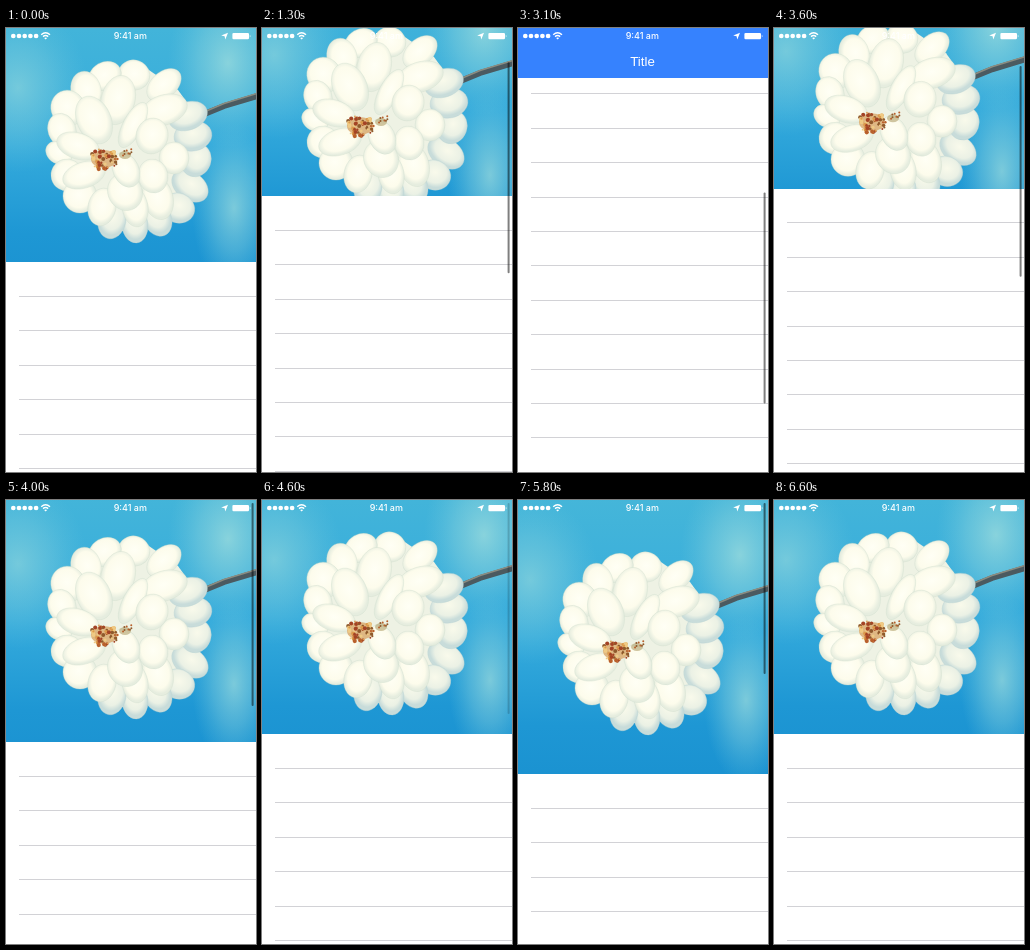
These frames come from a looping animation (250x444 px, 6.7 s). An HTML page:

```html
<!DOCTYPE html>
<html lang="en">
<head>
<meta charset="utf-8">
<title>Collapsing header</title>
<style>
  html, body { margin: 0; width: 100%; height: 100%; overflow: hidden; background: #fff; }
  svg { display: block; width: 100%; height: 100%; }
  text { fill: #fff; text-anchor: middle; }
</style>
</head>
<body>
<svg viewBox="0 0 250 444" xmlns="http://www.w3.org/2000/svg">
  <defs>
    <linearGradient id="sky" x1="0" y1="0" x2="0" y2="1">
      <stop offset=".1" stop-color="#45b6d9"/>
      <stop offset=".5" stop-color="#35abdc"/>
      <stop offset=".75" stop-color="#1e97d4"/>
      <stop offset="1" stop-color="#188fcf"/>
    </linearGradient>
    <radialGradient id="glow">
      <stop offset="0" stop-color="#a5e0dd" stop-opacity=".9"/>
      <stop offset=".5" stop-color="#90d6dd" stop-opacity=".5"/>
      <stop offset="1" stop-color="#70c8dc" stop-opacity="0"/>
    </radialGradient>
    <radialGradient id="lit" cy=".45">
      <stop offset="0" stop-color="#fffff5"/>
      <stop offset=".75" stop-color="#fdfcec"/>
      <stop offset="1" stop-color="#e6eddf"/>
    </radialGradient>
    <radialGradient id="dim" cy=".4">
      <stop offset="0" stop-color="#f9faeb"/>
      <stop offset=".7" stop-color="#ebf1e5"/>
      <stop offset="1" stop-color="#c8dcda"/>
    </radialGradient>
    <clipPath id="crop"><rect id="cropBox" width="250" height="234"/></clipPath>
  </defs>

  <rect width="250" height="444" fill="#fff"/>
  <g id="rows" fill="#d2d2d6"></g>

  <g clip-path="url(#crop)">
    <g id="photo">
      <rect y="-60" width="250" height="354" fill="url(#sky)"/>
      <ellipse cx="12" cy="60" rx="70" ry="85" fill="url(#glow)" opacity=".6"/>
      <ellipse cx="222" cy="35" rx="60" ry="85" fill="url(#glow)" opacity=".8"/>
      <ellipse cx="228" cy="180" rx="42" ry="85" fill="url(#glow)" opacity=".75"/>
      <path d="M196 87 L218 78 L251 68" fill="none" stroke="#4b5a60" stroke-width="6"/>
      <path d="M198 84 L218 75.5 L251 65.5" fill="none" stroke="#8b8c80" stroke-width="1.5"/>
      <path d="M86 46 L140 40 L172 62 L196 95 L192 160 L168 188 L128 206 L98 198 L70 172 L50 130 L55 85Z" fill="#eef2e4"/>
      <g id="petals"></g>
      <g id="heart"></g>
    </g>
    <rect id="tint" width="250" height="340" fill="#3682fe"/>
    <text id="title" x="124.5" y="38" font-family="'Liberation Sans', Arial, sans-serif" font-size="13.3">Title</text>
  </g>

  <rect id="thumb" x="245.6" width="2" rx="1" fill="#000"/>

  <g id="status" fill="#fff">
    <g id="signal"></g>
    <g fill="none" stroke="#fff" stroke-width="1.4">
      <path d="M35.2 6.7 Q39.6 2.9 44 6.7"/>
      <path d="M37 8.6 Q39.6 6.5 42.2 8.6"/>
    </g>
    <path d="M38.1 10 Q39.6 8.9 41.1 10 L39.6 11.6Z"/>
    <text x="124.3" y="11.3" font-family="Inter, 'Liberation Sans', sans-serif" font-size="9" font-weight="500">9:41 am</text>
    <path d="M222 4.8 L219.3 11.6 L218.6 8.3 L215.2 7.6Z"/>
    <rect x="226.4" y="4.9" width="16.6" height="6.4" rx="1.2"/>
    <path d="M243.8 6.8 q1.6 1.3 0 2.6Z"/>
  </g>
</svg>

<script>
const LOOP = 6700, STEP = 100;
const REST = 234, COLLAPSED = 50, ROW = 34.4, ROWS = 20, VIEW = 444;
const CONTENT = REST + ROWS * ROW;
const $ = id => document.getElementById(id);
const clamp = (v, lo = 0, hi = 1) => Math.min(hi, Math.max(lo, v));
const ramp = (v, from, to) => clamp((v - from) / (to - from));

function add(parent, tag, attrs) {
  const el = document.createElementNS('http://www.w3.org/2000/svg', tag);
  set(el, attrs);
  parent.appendChild(el);
  return el;
}
function set(el, attrs) {
  for (const key in attrs) el.setAttribute(key, attrs[key]);
}

// Petals from back to front: x, y, rx, ry, angle
const outer = [
  [184, 158, 20, 14, 35], [190, 132, 15, 17, 20], [172, 180, 17, 15, 20],
  [151, 190, 14, 19, -25], [129, 197, 13, 18, -5], [187, 108, 19, 15, -10],
  [182, 88, 20, 14, -20], [106, 192, 14, 19, 12]
];
const inner = [
  [158, 57, 20, 13, -42], [128, 47, 16, 15, 20], [99, 48, 17, 14, -30],
  [80, 62, 19, 15, 75], [62, 80, 17, 18, -25], [56, 102, 14, 17, -20],
  [53, 125, 14, 11, 30], [61, 147, 16, 16, 30], [74, 168, 17, 17, -45],
  [158, 82, 24, 15, -18], [168, 130, 15, 16, 0], [152, 170, 15, 22, -15],
  [129, 179, 13, 20, -10], [96, 179, 14, 19, 12], [112, 72, 17, 25, 14],
  [88, 92, 17, 25, -24], [72, 118, 22, 13, 18], [78, 147, 22, 13, -18],
  [127, 97, 10, 25, 28], [146, 108, 16, 18, 15], [147, 148, 15, 17, -10],
  [119, 164, 17, 19, -30], [120, 142, 13, 18, -25]
];
function petals(list, fill, edge) {
  for (const [x, y, rx, ry, angle] of list)
    add($('petals'), 'ellipse', {
      rx, ry, fill, stroke: edge, 'stroke-width': .6, 'stroke-opacity': .55,
      transform: `translate(${x} ${y}) rotate(${angle})`
    });
}
petals(outer, 'url(#dim)', '#b4cfd0');
petals(inner, 'url(#lit)', '#ccdacb');

let seed = 7;
const random = () => (seed = seed * 16807 % 2147483647) / 2147483647;
add($('heart'), 'ellipse', { cx: 98, cy: 131, rx: 13, ry: 9, fill: '#d9a86a', opacity: .8 });
add($('heart'), 'ellipse', { cx: 119, cy: 127, rx: 6, ry: 4, fill: '#b1a06a', opacity: .6 });
const warm = ['#b9602c', '#a34325', '#dc9a4c', '#efca84', '#8f5a2c'];
for (let i = 0; i < 60; i++) {
  const a = random() * 2 * Math.PI, r = Math.sqrt(random());
  add($('heart'), 'circle', {
    cx: 98 + 14 * r * Math.cos(a), cy: 131 + 11 * r * Math.sin(a),
    r: .8 + random() * 1.3, fill: warm[i % warm.length]
  });
}
for (let i = 0; i < 8; i++)
  add($('heart'), 'circle', { cx: 114 + random() * 15, cy: 121 + random() * 9, r: 1, fill: warm[(i % 2) * 4] });

for (let i = 0; i < 5; i++) add($('signal'), 'circle', { cx: 7.3 + i * 5.7, cy: 8, r: 2.35 });
const rows = Array.from({ length: ROWS }, () => add($('rows'), 'rect', { x: 13, width: 237, height: 1 }));

// Scroll position over time: drag, glide, fling back with bounce, pull and release
const keys = [
  [0, 0], [100, 1], [400, 5], [700, 15], [1000, 33], [1300, 66], [1400, 109],
  [1500, 162], [1700, 223], [1900, 263.6], [2200, 301], [2500, 322], [2800, 334],
  [3100, 340.2], [3200, 288], [3300, 212], [3500, 110], [3700, 44], [3900, 1],
  [4000, -8], [4100, -7.5], [4300, -2], [4400, 0], [4900, 0], [5000, -9],
  [5200, -45.2], [5400, -70], [5550, -76], [5650, -73], [5800, -40], [5950, -16],
  [6100, -5], [6200, -2], [6300, 0], [LOOP, 0]
];
const slope = i => (keys[i + 1][1] - keys[i][1]) / (keys[i + 1][0] - keys[i][0]);
function tangent(i) {
  if (i === 0 || i === keys.length - 1) return 0;
  const a = slope(i - 1), b = slope(i);
  return a * b <= 0 ? 0 : 2 * a * b / (a + b);
}
function scrollAt(t) {
  const i = Math.max(0, keys.findIndex(k => k[0] > t) - 1);
  const [t0, y0] = keys[i], [t1, y1] = keys[i + 1];
  const span = t1 - t0, u = (t - t0) / span, v = 1 - u;
  return v * v * (1 + 2 * u) * y0 + u * u * (3 - 2 * u) * y1
    + span * u * v * (v * tangent(i) - u * tangent(i + 1));
}

function thumbAlpha(t) {
  if (t < 4800) return ramp(t, 0, 200) * (1 - ramp(t, 4400, 4700));
  return ramp(t, 4900, 5050) * (1 - ramp(t, 6300, 6600));
}

function draw(t) {
  const scroll = scrollAt(t);
  const height = Math.max(COLLAPSED, REST - scroll);
  const covered = ramp(scroll, 90, REST - COLLAPSED);

  set($('cropBox'), { height: Math.round(height + .3) });
  set($('photo'), { transform: `translate(0 ${(height - REST) / 2})` });
  set($('tint'), { opacity: covered });
  set($('title'), { opacity: covered });
  rows.forEach((row, i) => set(row, { y: Math.floor(REST - scroll + ROW * (i + 1)) }));

  const track = VIEW - 6, length = track * VIEW / CONTENT;
  const travel = (track - length) / (CONTENT - VIEW);
  set($('thumb'), {
    y: 3 + Math.max(0, scroll) * travel,
    height: length + Math.min(0, scroll),
    opacity: .5 * thumbAlpha(t)
  });
}

const start = performance.now();
function tick() {
  const t = (performance.now() - start) % LOOP;
  draw(Math.floor(t / STEP) * STEP);
  requestAnimationFrame(tick);
}
tick();
</script>
</body>
</html>
```
